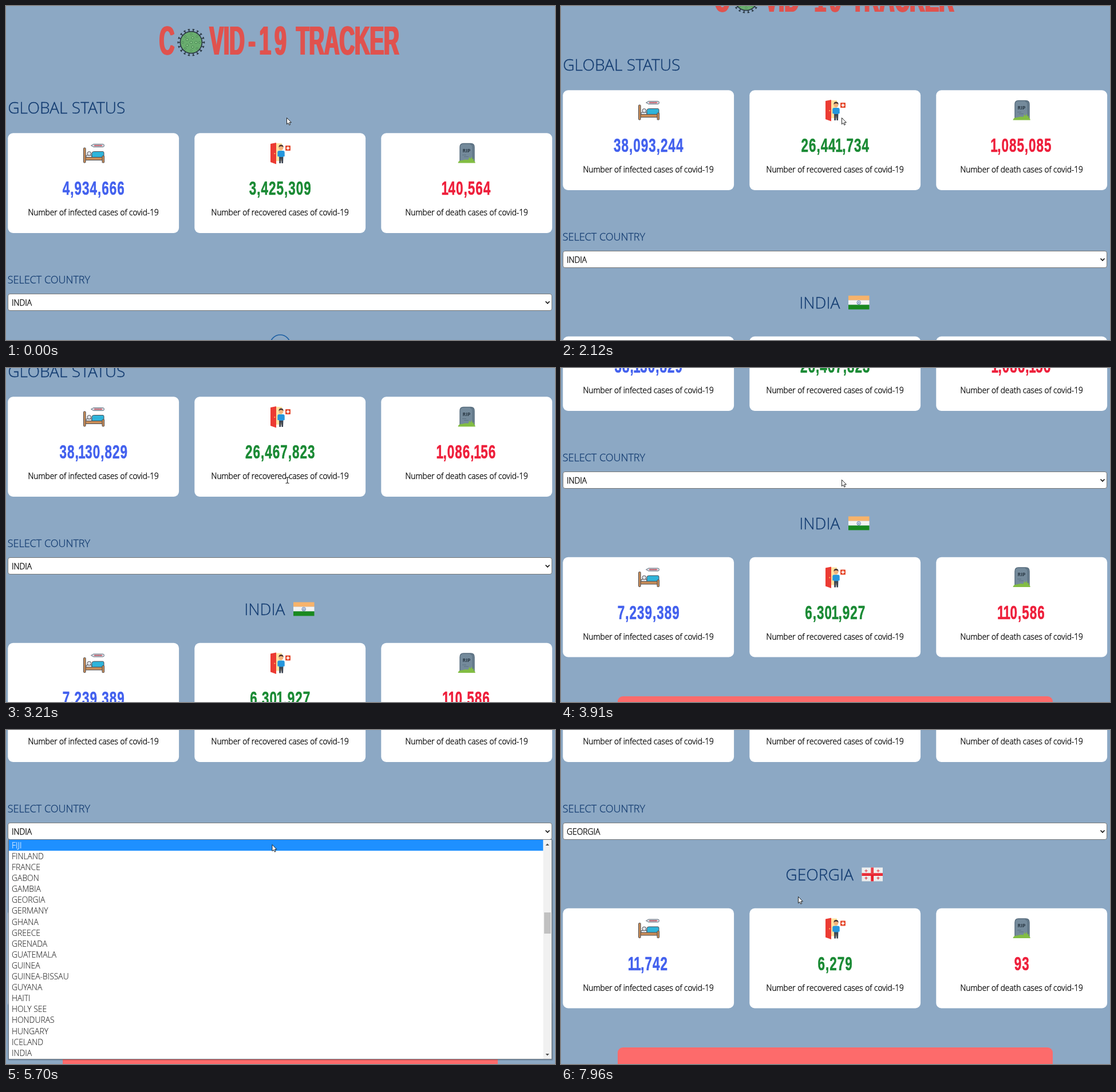
An HTML page for the animation above (8000 ms loop, 959 by 584 pixels).

```html
<!DOCTYPE html>
<html lang="en">
<head>
<meta charset="utf-8">
<title>Covid-19 tracker</title>
<style>
html, body { margin: 0; width: 100%; height: 100%; overflow: hidden; background: #8ca8c4; }
svg { display: block; }
text { font-family: "Open Sans", sans-serif; font-weight: 300; white-space: pre; }
.mid { text-anchor: middle; }
.h2 { font-size: 28.2px; fill: #123b70; stroke: #123b70; stroke-width: .3; }
.h3 { font-size: 18px; fill: #123b70; stroke: #123b70; stroke-width: .3; }
.label { font-size: 13.7px; fill: #000; stroke: #000; stroke-width: .35; }
.item { font-size: 13.9px; fill: #222; stroke: #222; stroke-width: .1; }
.item.on { fill: #fff; stroke: #fff; }
#choice { fill: #000; stroke: #000; stroke-width: .35; }
.title { font: bold 70px "Liberation Sans", Arial, sans-serif; fill: #e0524e; }
.num { font: bold 33px "Liberation Sans", Arial, sans-serif; text-anchor: middle; letter-spacing: .045em; stroke-width: .6; stroke-linejoin: round; }
.num .one { letter-spacing: -.02em; }
.rip { font: bold 8.6px "Open Sans", sans-serif; fill: #2b3a46; }
</style>
</head>
<body>
<svg id="stage" width="959" height="584" viewBox="0 0 959 584">
  <defs>
    <g id="bed" stroke="#4b4b50" stroke-width="1" stroke-linejoin="round">
      <path d="M148.500 244L153 241.500H169q2.500 0 2.500 2.500t-2.500 2.500H153z" fill="#d5dde6" stroke="#66717e"/>
      <path d="M154 244H168" stroke="#e0525c" stroke-width="1.800"/>
      <path d="M156 242.500v3M159 242.500v3M162 242.500v3M165 242.500v3" stroke="#66717e" stroke-width=".7"/>
      <rect x="140" y="261" width="10" height="4" fill="#e9eef4"/>
      <circle cx="145.300" cy="258" r="3.400" fill="#dfe3ea"/>
      <path d="M150 265V258q0-3.500 3.500-3.500H169q2 0 2 2V265z" fill="#2fb4da"/>
      <rect x="138" y="264.500" width="31" height="5" fill="#c98d58"/>
      <rect x="135.500" y="248" width="3.600" height="26" rx="1.200" fill="#c98d58"/>
      <rect x="168" y="262" width="3.600" height="12" rx="1" fill="#c98d58"/>
    </g>
    <g id="door">
      <path d="M472 240H482V271H472z" fill="#ffe3a0"/>
      <path d="M462 241L472 239V276.500L462 273z" fill="#ec3b33"/>
      <circle cx="469.300" cy="258" r="1" fill="#ffd25f"/>
      <path d="M477 262H484.500L484 275H481.500L480.800 266 480 275H477.300z" fill="#3d4552"/>
      <path d="M474.300 263V256q0-3 3-3H483.700q3 0 3 3V263H484.500V258 264H476.600V258 263z" fill="#2596dd"/>
      <circle cx="480.500" cy="248" r="3.900" fill="#f2b37c"/>
      <path d="M476.500 247.500q-.4-5 4-5t4 5q-1-2.300-4-2.300t-4 2.300z" fill="#4a3431"/>
      <rect x="488" y="244" width="9" height="9" rx="1" fill="#e54a2e"/>
      <path d="M492.500 245.800v5.400M489.800 248.500h5.400" stroke="#fff" stroke-width="1.800"/>
    </g>
    <g id="tomb">
      <path d="M793 271V247q0-6.500 6-6.500H812q6 0 6 6.500V271z" fill="#748a9b" stroke="#566b7c" stroke-width="1.400"/>
      <path d="M815.500 271V247q0-5-4.500-5.200" fill="none" stroke="#5f7586" stroke-width="2"/>
      <text class="rip mid" x="804.500" y="255.500">RIP</text>
      <path d="M797 260.500h7M800 263.500h8" stroke="#5d7283"/>
      <path d="M789.500 274.500q1-5 7-4.500 6-2.500 11-1l2-5 1.500 3.500 3-4 .5 4.500 3-1-.8 3q3 1 3 4.500z" fill="#82bd43"/>
    </g>
    <g id="India">
      <path d="M502 581.500h36.500v8H502z" fill="#f5a653"/>
      <path d="M502 589.500h36.500v8H502z" fill="#f1f2f2"/>
      <path d="M502 597.500h36.500v8H502z" fill="#19891f"/>
      <circle cx="520.200" cy="593.500" r="3.200" fill="#c9d6ea" stroke="#5573a8"/>
      <circle cx="520.200" cy="593.500" r="1" fill="#5573a8"/>
      <path d="M502 581.500h36.500v12H502z" fill="#fff" opacity=".14"/>
    </g>
    <g id="Georgia">
      <path d="M525.500 581.500H562v24H525.500z" fill="#eceded"/>
      <path d="M543.700 581.500v24M525.500 593.500H562" stroke="#e8202c" stroke-width="4.800"/>
      <path d="M533 584.800v5M530.500 587.300h5M554 584.800v5M551.500 587.300h5M533 597.400v5M530.500 599.900h5M554 597.400v5M551.500 599.900h5" stroke="#e0434c" stroke-width="1.400"/>
      <path d="M525.500 581.500H562v12H525.500z" fill="#fff" opacity=".14"/>
    </g>
  </defs>

  <g id="page">
    <g id="title">
      <text class="title" transform="translate(267.700 84.500) scale(.525 1)">C</text>
      <text class="title" transform="translate(355.500 84.500) scale(.525 1)">VID</text>
      <text class="title" transform="translate(423.500 84.500) scale(.525 1)">-</text>
      <text class="title" transform="translate(442.500 84.500) scale(.525 1)" letter-spacing="12">19</text>
      <text class="title" transform="translate(507 84.500) scale(.525 1)">TRACKER</text>
    </g>
    <use href="#title" x="-1.300"/>
    <use href="#title" x="1.300"/>
    <g id="virus" transform="translate(323.400 63.700)"></g>

    <text class="h2" x="3.200" y="187.500">GLOBAL STATUS</text>
    <g id="world"></g>

    <text class="h3" x="2.700" y="485">SELECT COUNTRY</text>
    <rect x="3.500" y="503.500" width="950" height="29" rx="3.500" fill="#fff" stroke="#767676"/>
    <text class="item" id="choice" x="10" y="523.500"></text>
    <path d="M942.500 516.500l3.500 3.500 3.500-3.500" fill="none" stroke="#111" stroke-width="1.700"/>

    <circle id="spinner" cx="479" cy="592.500" r="17.500" fill="none" stroke="#1c5fa3" stroke-width="1.600"/>
    <g id="country">
      <text class="h2" id="name" y="604.400" text-anchor="end"></text>
      <use id="flag"/>
      <g id="local" transform="translate(0 430.500)"></g>
    </g>
    <rect x="99" y="896" width="760" height="240" rx="9" fill="#fd6b6b"/>
  </g>

  <g id="popup">
    <rect x="3" y="192" width="953" height="386" rx="2" fill="#000" opacity=".14"/>
    <rect x="4.500" y="191.500" width="949" height="384" fill="#fff" stroke="#6c7580"/>
    <rect id="bar" x="5" width="933.500" height="19.100" fill="#1e90ff"/>
    <g id="items"></g>
    <rect x="938.500" y="192" width="14.500" height="383" fill="#f1f1f1"/>
    <rect x="940" y="319" width="11.500" height="37" fill="#c1c1c1"/>
    <path d="M942.500 202l3.200-3.500 3.200 3.500zM942.500 566l3.200 3.500 3.200-3.500z" fill="#505050"/>
  </g>

  <g id="pointer">
    <path id="arrow" d="M0 0V11.300L2.600 8.900 4.300 12.700 6.100 11.900 4.500 8.200H7.900z" fill="#fff" stroke="#111" stroke-width=".9"/>
    <path id="beam" d="M-2 -4.500q2.600 0 3 1 .4-1 3-1M1 -3.500V5M-2 6q2.600 0 3-1 .4 1 3 1" fill="none" stroke="#222" stroke-width="1.100"/>
  </g>
</svg>

<script>
const $ = id => document.getElementById(id);
const show = (id, on) => { $(id).style.display = on ? '' : 'none'; };

const LOOP = 8000, STEP = 78.04;   // ms per loop, ms per screen refresh
const LOADED = 5, OPEN = 68, CLOSE = 86, SWITCH = 91;
const ROW = 19.1, LIST_TOP = 192;
const WORLD = [38130829, 26467823, 1086156];
const INDIA = [7239389, 6301927, 110586];
const GEORGIA = [12841, 6867, 102];

const COUNTRIES = ('FIJI,FINLAND,FRANCE,GABON,GAMBIA,GEORGIA,GERMANY,GHANA,GREECE,GRENADA,GUATEMALA,' +
  'GUINEA,GUINEA-BISSAU,GUYANA,HAITI,HOLY SEE,HONDURAS,HUNGARY,ICELAND,INDIA').split(',');

const CARDS = [
  { x: 3.3, icon: 'bed', color: '#4361ee', kind: 'infected' },
  { x: 329.3, icon: 'door', color: '#1a8a34', kind: 'recovered' },
  { x: 655.3, icon: 'tomb', color: '#ee1f3b', kind: 'death' }
];

const cardRow = id => {
  $(id).innerHTML = CARDS.map(c => {
    const mid = c.x + 149.4;
    return `<rect x="${c.x}" y="222.300" width="298.800" height="174.700" rx="9" fill="#fff"/>
      <use href="#${c.icon}"/>
      <text class="num" fill="${c.color}" stroke="${c.color}" transform="translate(${mid + 0.5} 330.300) scale(.68 1)"></text>
      <text class="label mid" x="${mid}" y="366">Number of ${c.kind} cases of covid-19</text>`;
  }).join('');
  return [...$(id).querySelectorAll('.num')];
};
const worldNums = cardRow('world'), localNums = cardRow('local');

$('items').innerHTML = COUNTRIES.map((c, i) =>
  `<text class="item" x="10" y="${206.8 + i * ROW}">${c}</text>`).join('');
const items = [...$('items').children];

// Virus: spiked ring, body and spots
const ring = (n, r) => Array.from({ length: n }, (_, i) => {
  const a = i / n * 2 * Math.PI;
  return [r * Math.cos(a), r * Math.sin(a)];
});
$('virus').innerHTML =
  ring(18, 1).map(([x, y]) =>
    `<path d="M${x * 19} ${y * 19}L${x * 23} ${y * 23}M${x * 23 - y * 1.8} ${y * 23 + x * 1.8}L${x * 23 + y * 1.8} ${y * 23 - x * 1.8}" stroke="#2c3a45" stroke-width="1.700"/>`).join('') +
  '<circle r="19" fill="#69ad6e" stroke="#2c3a45" stroke-width="1.700"/>' +
  [[0, 0], ...ring(5, 8.5), ...ring(8, 14.5)].map(([x, y], i) =>
    `<circle cx="${x}" cy="${y}" r="${i < 6 ? 2 : 1.4}" fill="#8fce8d" stroke="#3f7a4c" stroke-width=".9"/>`).join('');

// Linear interpolation through rows of [step, value]
const along = (keys, k) => {
  if (k <= keys[0][0]) return keys[0][1];
  for (let i = 1; i < keys.length; i++) {
    const [a, u] = keys[i - 1], [b, v] = keys[i];
    if (k <= b) return u + (v - u) * (k - a) / (b - a);
  }
  return keys[keys.length - 1][1];
};

// Exponential ease-out and its inverse, for the counters
const ease = x => x >= 10 ? 1 : (1 - 2 ** -x) * 1024 / 1023;
const unease = f => -Math.log2(1 - f * 1023 / 1024);
const worldPace = [
  [0, unease(4934666 / WORLD[0])],
  [18, unease(37596841 / WORLD[0])],
  [27, unease(38093244 / WORLD[0])],
  [30, 10]
];
const localPace = [[SWITCH, 0], [102, unease(11742 / GEORGIA[0])]];

const scrollKeys = [
  [24, 0], [25, 10], [26, 45], [27, 75], [28, 85], [33, 85],
  [34, 105], [35, 150], [36, 170.5], [39, 170.5], [41, 172], [42, 198], [43, 238], [44, 256],
  [47, 256], [48, 270], [49, 299], [50, 322], [51, 341]
];
const xKeys = [[65, 490.5], [66, 486], [67, 482], [68, 480], [71, 480], [72, 477], [73, 465],
  [75, 440], [76, 430], [78, 419], [80, 414.5]];
const yKeys = [[60, 195.5], [61, 194.7], [65, 194.7], [66, 184], [67, 172], [68, 168], [69, 176.5],
  [71, 176.5], [72, 182], [73, 200.5], [75, 245], [76, 262], [78, 283], [80, 291.5]];

const setNums = (nodes, totals, f) => nodes.forEach((n, i) => {
  const s = Math.round(totals[i] * f).toLocaleString('en-US');
  if (n.dataset.s === s) return;
  n.dataset.s = s;
  n.innerHTML = s.replace(/1/g, '<tspan class="one" dx="-.06em">1</tspan>');
});

function draw(t) {
  const k = Math.floor((t + 11) / STEP);
  const x = along(xKeys, k), y = along(yKeys, k);
  const switched = k >= SWITCH;

  $('page').setAttribute('transform', `translate(0 ${-along(scrollKeys, k)})`);
  setNums(worldNums, WORLD, ease(along(worldPace, k)));
  setNums(localNums, switched ? GEORGIA : INDIA, switched ? ease(along(localPace, k)) : 1);

  show('spinner', k < LOADED);
  show('country', k >= LOADED);
  $('name').textContent = switched ? 'GEORGIA' : 'INDIA';
  $('name').setAttribute('x', switched ? 511 : 487.5);
  $('flag').setAttribute('href', switched ? '#Georgia' : '#India');
  $('choice').textContent = k >= CLOSE ? 'GEORGIA' : 'INDIA';

  const row = y > LIST_TOP ? Math.floor((y - LIST_TOP) / ROW) : COUNTRIES.length - 1;
  show('popup', k >= OPEN && k < CLOSE);
  $('bar').setAttribute('y', LIST_TOP + row * ROW);
  items.forEach((n, i) => n.classList.toggle('on', i === row));

  const overText = k >= 36 && k < 43;
  show('beam', overText);
  show('arrow', !overText);
  $('pointer').setAttribute('transform', `translate(${x} ${y})`);
}

const start = performance.now();
function tick() {
  draw((performance.now() - start) % LOOP);
  requestAnimationFrame(tick);
}
tick();
</script>
</body>
</html>
```
